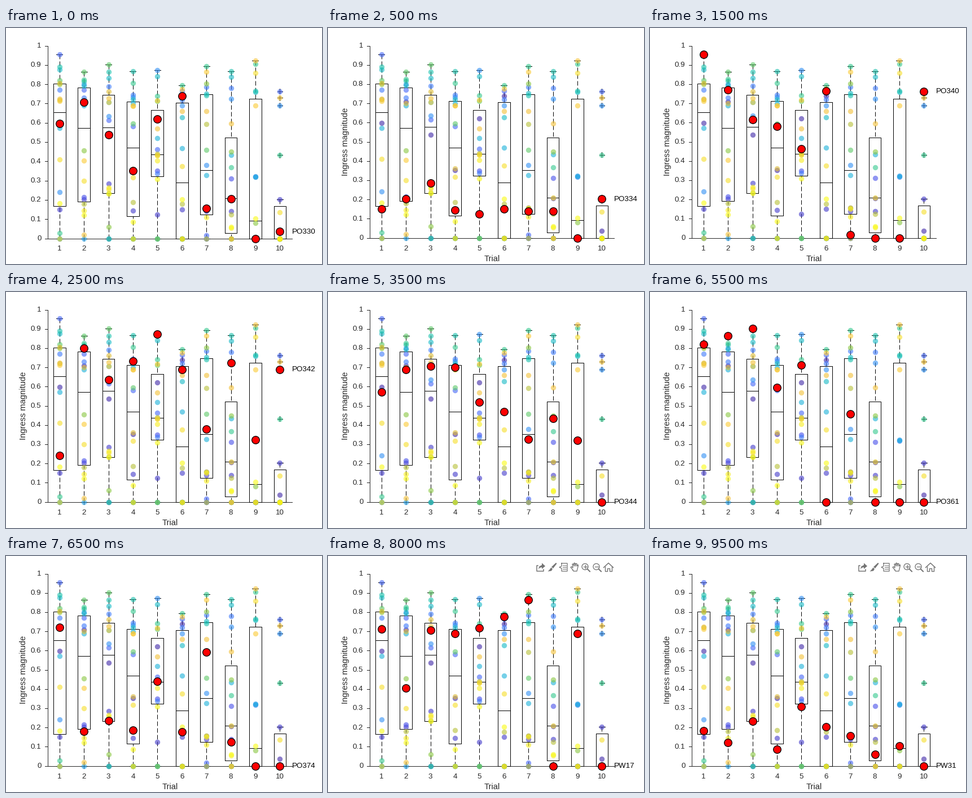
A matplotlib script for the animation above (10 s loop, 560 px wide and 420 px high).

```python
import numpy as np
import matplotlib.pyplot as plt
from matplotlib.animation import FuncAnimation
from matplotlib.colors import LinearSegmentedColormap
from matplotlib.patches import Circle, Polygon

W, H, DPI = 560, 420, 100
PX = 72 / DPI  # points per pixel
LEFT, RIGHT, STEP = 73.5, 507, 43.4
INK, GREY = "#262626", "#747474"
plt.rcParams["font.family"] = "Liberation Sans"

_ = 0  # no ingress; trailing trials without any are left out
SUBJECTS = {
    "PO330": [.597, .708, .538, .352, .62, .738, .155, .206, _, .036],
    "PO334": [.15, .203, .285, .145, .125, .15, .14, .14, _, .203],
    "PO337": [_, .215, _, _, .35, _, _, .31],
    "PO340": [.955, .771, .615, .581, .462, .766, .015, _, _, .763],
    "PO341": [.77, .73, .79, .745, .337, .72, .785, .78, .318],
    "PO342": [.24, .80, .635, .732, .873, .69, .38, .725, .322, .69],
    "PO343": [],
    "PO344": [.573, .69, .706, .70, .52, .468, .327, .433, .32],
    "PO348": [.875, .793, .832, .722, .84, .627, .752, .838, .76],
    "PO352": [.89, .816, .865, .868, _, _, .742, .868, .764],
    "PO356": [.028, .825, _, .805, .74, .795, .893, .368, .905, .432],
    "PO361": [.82, .865, .902, .595, .712, _, .458],
    "PO368": [.80, .455, .06, _, _, _, .803, .45, .08],
    "PO374": [.72, .18, .235, .187, .44, .178, .593, .125],
    "PW10": [.806, .70, .763, .36, .434],
    "PW14": [.725, .02, .727, .69, .57, .66, .66, .595, .923, .73],
    "PW17": [.712, .405, .706, .688, .717, .775, .863, _, .69],
    "PW22": [.41, .30, .255, .317, .43, .375, .15, .21, .858, .135],
    "PW27": [_, .145, .265, _, .405, _, .11, .053],
    "PW31": [.183, .12, .232, .085, .308, .203, .157, .06, .104],
}
LABELS = list(SUBJECTS)
DATA = np.array([row + [0] * (10 - len(row)) for row in SUBJECTS.values()])
N, TRIALS = DATA.shape
X = LEFT + STEP * (np.arange(TRIALS) + 0.5) - 0.5

PARULA = LinearSegmentedColormap.from_list("parula_like", [
    (.242, .150, .660), (.278, .290, .905), (.270, .440, .998),
    (.176, .580, .950), (.110, .690, .860), (.070, .745, .725),
    (.240, .793, .510), (.560, .780, .240), (.850, .730, .200),
    (.995, .765, .225), (.960, .885, .155), (.977, .984, .080)])
COLORS = PARULA(np.linspace(0, 1, N))

fig = plt.figure(figsize=(W / DPI, H / DPI), dpi=DPI, facecolor="white")
ax = fig.add_axes([0, 0, 1, 1])


def line(xs, ys, color="black", width=1, **kw):
    ax.plot(xs, ys, color=color, lw=width * PX, **kw)


def text(x, y, s, size=13.33, color=INK, **kw):
    ax.text(x, y, s, fontsize=size * PX, color=color, **{"va": "center", **kw})


def dots(xs, ys, diameter, **kw):
    ax.scatter(xs, ys, s=(diameter * PX) ** 2, **kw)


def draw_axes(to_y, named):
    base = to_y(0)
    line([LEFT, LEFT], [to_y(1), base], INK)
    line([LEFT, RIGHT], [base, base], INK)
    for k in range(11):
        y = to_y(k / 10)
        line([LEFT - 4.5, LEFT], [y, y], INK)
        text(62.5, y + 0.5, f"{k / 10:g}", ha="right")
    for k, x in enumerate(X, 1):
        line([x, x], [base, base + 4.5], INK)
        text(x, 393.5, str(k), ha="center")
    if named:
        text(290.5, 411, "Trial", 14.67, ha="center")
        text(31.5, 202.5, "Ingress magnitude", 14.67, ha="center", rotation=90)


def draw_box(x, values, to_y):
    q1, median, q3 = np.percentile(values, [25, 50, 75], method="hazen")
    reach = 1.5 * (q3 - q1)
    inside = values[(values >= q1 - reach) & (values <= q3 + reach)]
    for quartile, end in ((q1, inside.min()), (q3, inside.max())):
        line([x, x], to_y(np.array([end, quartile])),
             dashes=(8, 4), dash_capstyle="butt")
        line([x - 5.5, x + 5.5], [to_y(end)] * 2)
    a, b = x - 10.8, x + 10.8
    bottom, top = to_y(q1), to_y(q3)
    line([a, b, b, a, a], [bottom, bottom, top, top, bottom])
    line([a, b], [to_y(median)] * 2)
    for v in values[values > q3 + reach]:
        y = to_y(v)
        line([x - 4.5, x + 4.5], [y, y])
        line([x, x], [y - 4.5, y + 4.5])


def shape(points, **kw):
    ax.add_patch(Polygon(points, **{"color": GREY, "lw": 0, **kw}))


def magnifier(x, y, plus):
    ax.add_patch(Circle((x - 1, y - 1), 5.5, fill=False, ec=GREY, lw=1.3 * PX))
    line([x + 3, x + 7.5], [y + 3, y + 7.5], GREY, 2)
    line([x - 4, x + 2], [y - 1, y - 1], GREY, 1.3)
    if plus:
        line([x - 1, x - 1], [y - 4, y + 2], GREY, 1.3)


def draw_toolbar(y=20):
    # export
    line([372, 370, 370, 382, 382], [17, 17, 27, 27, 24], GREY, 1.5)
    shape([(373, 24), (374, 19), (379, 16), (379, 12.5), (385, 18),
           (379, 23), (379, 20), (375, 21)])
    # brush
    shape([(404, 12), (405.5, 13.5), (399, 22), (396, 19.5)])
    shape([(395.5, 20.5), (398, 23), (396, 26.5), (389.5, 27.5), (392, 25)])
    # data tip
    line([414, 424, 424, 414, 414, 410, 414, 414],
         [13, 13, 27, 27, 22, 20, 18, 13], GREY, 1.3)
    for dy in (-3, 0, 3):
        line([416, 422], [y + dy] * 2, GREY)
    # hand
    line([434, 430, 431.5, 434, 433, 434.5, 436, 436, 437.5, 438.5, 439,
          441, 441, 443, 443.5, 441, 435, 434],
         [25, 20, 19, 21, 14.5, 14, 18, 12.5, 12.5, 18, 13.5,
          13.5, 18, 15.5, 17, 27, 27, 25], GREY, 1.3)
    magnifier(456.5, y, True)
    magnifier(476.5, y, False)
    # home
    line([488.5, 497, 505.5], [20.5, 12.5, 20.5], GREY, 1.5)
    line([491, 491, 495, 495, 499, 499, 503, 503],
         [19, 27, 27, 22, 22, 27, 27, 19], GREY, 1.4)


def draw(i):
    ax.cla()
    ax.set(xlim=(0, W), ylim=(H, 0))
    ax.axis("off")
    base = 373.5 if i else 374.5

    def to_y(v):
        return base - (base - 31.5) * v

    draw_axes(to_y, named=i > 0)
    for x, values in zip(X, DATA.T):
        draw_box(x, values, to_y)
    for row, color in zip(DATA, COLORS):
        dots(X, to_y(row), 9.4, color=[color], alpha=0.6, lw=0, zorder=3)
    dots(X, to_y(DATA[i]), 13.6, color="red", ec="black", lw=1.3 * PX, zorder=4)
    text(507, to_y(DATA[i, -1]) + 0.5, LABELS[i], color="black", zorder=5)
    if i >= 16:
        draw_toolbar()
    return []


anim = FuncAnimation(fig, draw, frames=N, interval=500, repeat=True,
                     repeat_delay=0, init_func=lambda: [])
plt.show()
```
